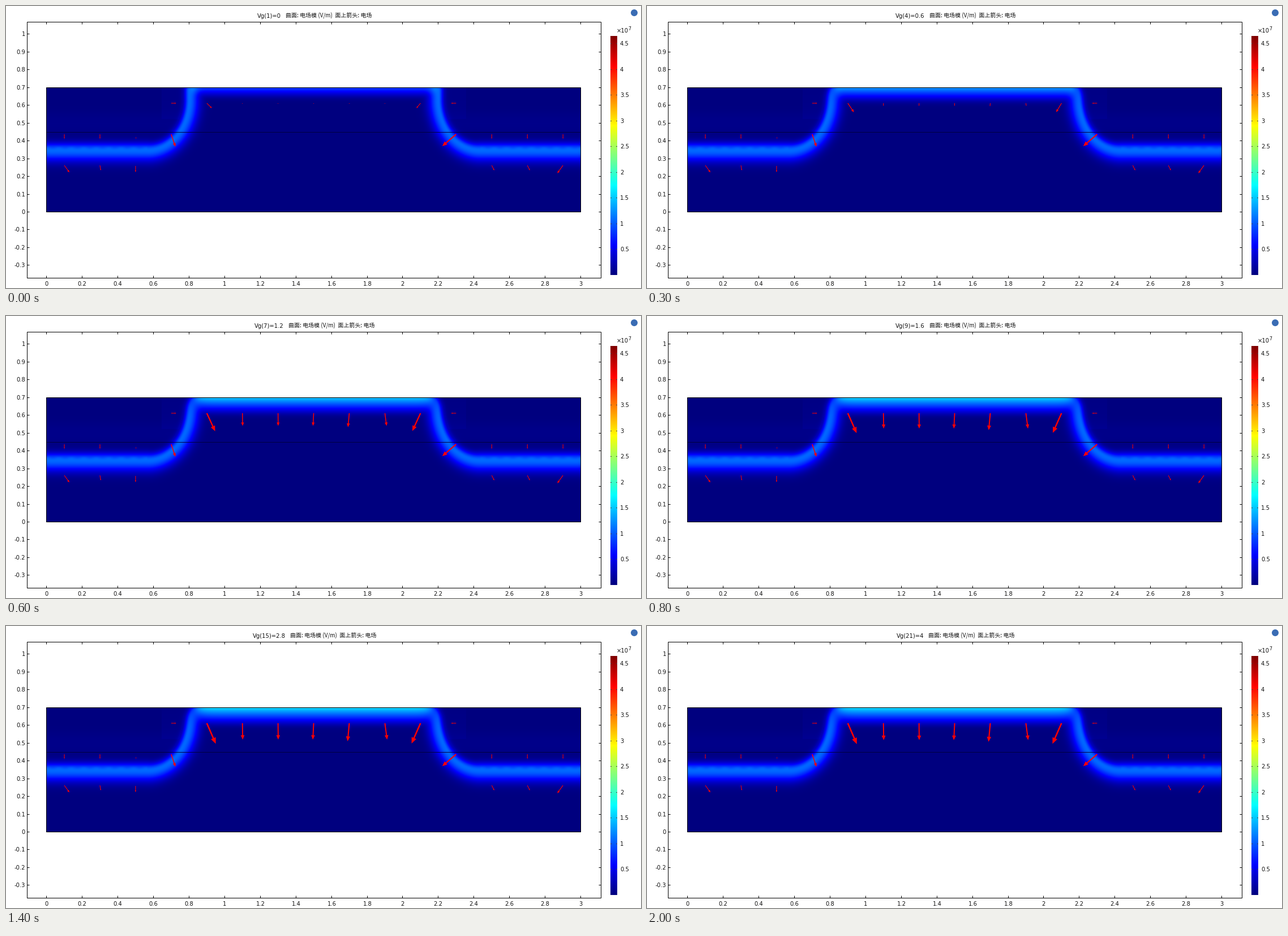
Write a matplotlib script that moves like this. It is 1122 px wide and 499 px high and loops after 2100 ms.

```python
import numpy as np
import matplotlib.pyplot as plt
from matplotlib.animation import FuncAnimation
from matplotlib.collections import PolyCollection
from matplotlib.colors import LinearSegmentedColormap
from matplotlib.patches import Circle, Rectangle

W, H, DPI = 1122, 499, 100
PX = 72 / DPI              # one pixel in points
FRAMES, STEP_MS = 21, 100
X0, Y0, UNIT = 71.6, 364.5, 314.67
E_MAX = 4.65               # 1e7 V/m

rainbow = LinearSegmentedColormap.from_list("rainbow", [
    (0, (0, 0, .5)), (.125, (0, 0, 1)), (.375, (0, 1, 1)),
    (.625, (1, 1, 0)), (.875, (1, 0, 0)), (1, (.5, 0, 0))], N=1024)


def px(x):
    return X0 + UNIT * x


def py(y):
    return Y0 - UNIT * y


def mid(p):
    return np.floor(p) + .5


fig = plt.figure(figsize=(W / DPI, H / DPI), dpi=DPI, facecolor="white")
ax = fig.add_axes([0, 0, 1, 1])
ax.axis("off")


def line(x1, y1, x2, y2, color="black"):
    ax.plot([x1, x2], [y1, y2], color=color, lw=PX,
            solid_capstyle="butt", snap=False, zorder=3)


def box(x1, y1, x2, y2):
    ax.add_patch(Rectangle((x1, y1), x2 - x1, y2 - y1, fill=False,
                           ec="black", lw=PX, snap=False, zorder=3))


def label(x, y, s, ha="left", size=10, font="DejaVu Sans"):
    return ax.text(x, y, s, ha=ha, va="baseline", fontsize=size * PX,
                   family=font, color="#111111")


# ---- electric field ----
gx, gy = np.meshgrid(np.arange(72, 1015) + .5, np.arange(145, 364) + .5)
mx = np.minimum(gx, 1088 - gx)      # mirror about the device centre
depth = gy - 144.5
RX, RY = 74, 91


def edge_field(bend):
    """Junction field around the well: flat floor, elliptic corner, upright side."""
    u = np.maximum(mx - 251 - 10 * bend * np.exp(-depth / 12), 0) + 1e-6
    v = np.maximum(gy - 165, 0) + 1e-6
    r = np.hypot(u / RX, v / RY)
    slope = np.hypot(u / RX**2, v / RY**2)
    dist = (r - 1) * r / slope + 1
    upright = u / RX**2 / slope
    spread = np.where(dist < 0, 13 - 4 * upright, 20 - 2 * upright)
    peak = 1.06 * np.exp(-(dist / spread)**2)
    ripple = .03 * np.sin(mx / 3.5) * np.exp(-((gy - 251) / 3)**2) * (mx < 250)
    glow = .05 * np.exp(-((gy - 208) / 20)**2) + .04 * ((mx > 275) & (gy < 200))
    return peak + ripple + glow * (dist < -12)


def field(vg):
    on = np.tanh(vg / .95)
    width = 19 + 15 * on
    gate = .047 * 3 * np.logaddexp(0, (width - depth) / 3)
    gate /= 1 + np.exp(-(mx - 326 - 8 * on) / (3 + 3 * on))
    side = edge_field(on) * (1 - .5 * on * np.exp(-depth / 12))
    return np.hypot(side, gate)


# ---- arrows ----
fixed = [(x, 227, 0, 8) for x in (.1, .3, 2.5, 2.7, 2.9)]
fixed += [(.7, 172, 9, 0), (2.3, 172, -9, 0), (.5, 233, 1.5, 1),
          (.7, 227, 7.5, 22), (2.3, 227, -24.5, 21)]
fixed += [(.1, 282, 9, 12.5), (.3, 282, 1.5, 9), (.5, 283, 0, 11),
          (2.5, 282, 4.5, 9), (2.7, 282, 4.5, 9), (2.9, 282, -10, 14)]
channel = [(1.1, .5), (1.3, .3), (1.5, -1.5), (1.7, -3), (1.9, 4)]


def arrow(x, y, dx, dy):
    size = np.hypot(dx, dy)
    along = np.array([dx, dy]) / size
    across = np.array([-along[1], along[0]])
    shaft = max(.5, .033 * size)
    head = max(.5, .115 * size)
    neck = .73 * size
    outline = [(0, shaft), (neck, shaft), (neck, head), (size, 0),
               (neck, -head), (neck, -shaft), (0, -shaft)]
    return np.array([(px(x), y) + a * along + b * across for a, b in outline])


def arrows(vg):
    s = .02 + (.88 + .025 * vg) / (1 + np.exp((.92 - vg) / .2))
    g = s**.6
    moving = [(x, 172, dx * s, (30 + (x == 1.7) * 3) * s) for x, dx in channel]
    moving += [(.9, 172, 8 + 8 * g, 5 + 32 * g),
               (2.1, 172, -6 - 10 * g, 5 + 31.5 * g)]
    return [arrow(*a) for a in fixed + moving]


# ---- axes frame, ticks, colour bar ----
L, R, T, B = 37.5, 1051.5, 28.5, 481.5
box(L, T, R, B)
for k in range(16):
    x = mid(px(k / 5))
    line(x, B - 4, x, B)
    line(x, T, x, T + 4)
    label(x, 495, f"{k / 5:g}", "center")
for k in range(-3, 11):
    y = mid(py(k / 10))
    line(L, y, L + 4, y)
    line(R - 4, y, R, y)
    label(34, y + 3.7, f"{k / 10:g}", "right")

ax.imshow(np.linspace(1, 0, 423)[:, None], cmap=rainbow, vmin=0, vmax=1,
          extent=(1068, 1080, 476, 53), aspect="auto", interpolation="nearest")
for k in range(1, 10):
    y = mid(476 - 45.5 * k)
    line(1068, y, 1070, y, "#444444")
    line(1078, y, 1080, y, "#444444")
    label(1085, y + 3.7, f"{k / 2:g}")
label(1078.5, 46.5, "×10")
label(1099.5, 42.5, "7", size=8)
ax.add_patch(Circle((1110, 12), 6, color="#3a6cb4", lw=0))

# ---- device ----
surface = ax.imshow(field(0), cmap=rainbow, vmin=0, vmax=E_MAX,
                    extent=(72, 1015, 364, 145), aspect="auto",
                    interpolation="nearest")
ax.set_xlim(0, W)
ax.set_ylim(H, 0)
box(71.5, 144.5, 1015.5, 364.5)
line(72, 223.5, 1015, 223.5, "#000040")
quiver = PolyCollection(arrows(0), facecolors="red", edgecolors="none", zorder=4)
ax.add_collection(quiver)

step_text = label(444, 20.5, "")
plot_text = label(494, 20.5, "曲面: 电场模 (V/m)  面上箭头: 电场", font="Noto Sans CJK JP")


def draw(i):
    vg = i / 5
    text = f"Vg({i + 1})={vg:g}"
    extra = 6.36 * (len(text) - 7) - 3.18 * text.count(".")
    step_text.set_text(text)
    step_text.set_x(444 - extra / 2)
    plot_text.set_x(494 + extra / 2)
    surface.set_data(field(vg))
    quiver.set_verts(arrows(vg))
    return surface, quiver, step_text, plot_text


anim = FuncAnimation(fig, draw, frames=FRAMES, interval=STEP_MS,
                     init_func=lambda: draw(0), repeat=True, repeat_delay=0)
plt.show()
```
